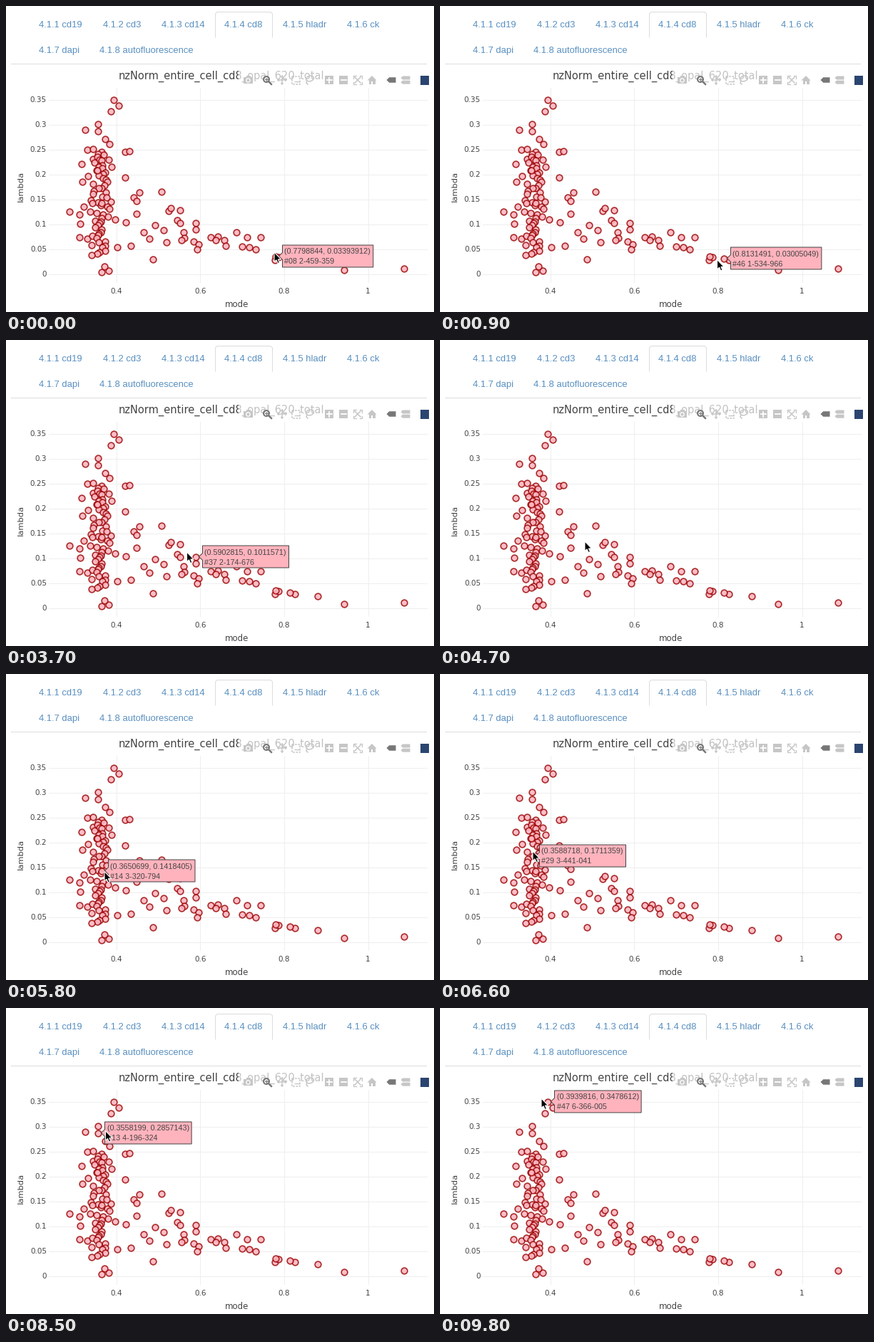
A matplotlib script for the animation above (9.9 s loop, 600 by 430 pixels).

```python
import numpy as np
import matplotlib.pyplot as plt
from matplotlib.animation import FuncAnimation
from matplotlib.patches import Circle, Ellipse, Polygon, Rectangle

W, H, DPI = 600, 430, 100
FRAMES, STEP = 99, 100
PX = 72 / DPI  # points per pixel

SANS, WIDE = "Liberation Sans", "DejaVu Sans"
LINK, INK, GRID = "#5a90c0", "#444444", "#eeeeee"
PINK, RED = (1, 182 / 255, 193 / 255, .9), (152 / 255, 0, 0, .8)
FAINT, ACTIVE, NAVY = "#c6c6c6", "#777777", "#2b4570"

fig = plt.figure(figsize=(W / DPI, H / DPI), dpi=DPI, facecolor="white")
ax = fig.add_axes([0, 0, 1, 1])
ax.set_xlim(0, W)
ax.set_ylim(H, 0)
ax.axis("off")


def to_px(mode, lam):
    return 154.5 + (mode - .4) * 588.5, 376 - lam * 700


def to_data(x, y):
    return .4 + (x - 154.5) / 588.5, (376 - y) / 700


def write(x, y, s, size, color=INK, font=SANS, **kw):
    return ax.text(x, y, s, fontsize=size * PX, color=color, family=font,
                   va=kw.pop("va", "baseline"), **kw)


def line(xs, ys, color, width=1, z=1, **kw):
    ax.plot(xs, ys, color=color, lw=width * PX, zorder=z, **kw)


def shape(patch, fill="none", edge="none", width=1, z=6):
    patch.set(facecolor=fill, edgecolor=edge, linewidth=width * PX, zorder=z)
    return ax.add_patch(patch)


def draw_tabs():
    row1 = [(46, "4.1.1 cd19"), (136, "4.1.2 cd3"), (218, "4.1.3 cd14"),
            (306.5, "4.1.4 cd8"), (388, "4.1.5 hladr"), (478, "4.1.6 ck")]
    row2 = [(46, "4.1.7 dapi"), (131, "4.1.8 autofluorescence")]
    for base, row in ((30, row1), (66, row2)):
        for x, s in row:
            write(x, base, s, 13, LINK)
    line([293.5, 293.5, 296, 371, 373.5, 373.5],
         [44, 11, 8.5, 8.5, 11, 44], "#dcdcdc")
    line([7, 589], [80.5, 80.5], "#dcdcdc")
    line([0, W], [429.5, 429.5], "#c4c4c4")


def draw_axes():
    for i in range(4):
        x = 154.5 + i * 117.7
        line([x, x], [115, 388], GRID)
        write(x, 404, f"{.4 + .2 * i:.1g}", 10.4, font=WIDE, ha="center")
    for i in range(8):
        y = 376.5 - 35 * i
        line([60, 590], [y, y], GRID)
        write(57, y + 3.5, f"{.05 * i:g}", 10.4, font=WIDE, ha="right")
    write(323.5, 423, "mode", 11.7, font=WIDE, ha="center")
    write(21, 253, "lambda", 11.5, font=WIDE, ha="center", va="center",
          rotation=90)
    write(158, 103, "nzNorm_entire_cell_cd8_opal_620_total", 14.65, font=WIDE)


def draw_modebar():
    y = 104
    shape(Rectangle((326, 90), 269, 24), (1, 1, 1, .68), z=5)

    # camera
    shape(Rectangle((333, 100), 13, 9), FAINT)
    shape(Rectangle((336.5, 98), 6, 3), FAINT)
    shape(Circle((339.5, 104.5), 2.7), FAINT, "white", 1.3)

    # magnifier
    shape(Circle((365, 103), 4), edge=ACTIVE, width=2)
    line([368, 372], [106, 110], ACTIVE, 2.4, 6)
    line([363, 367], [103, 103], ACTIVE, 1, 6)
    line([365, 365], [101, 105], ACTIVE, 1, 6)

    # pan arrows
    line([381, 393], [y, y], FAINT, 1.5, 6)
    line([387, 387], [98, 110], FAINT, 1.5, 6)
    for dx, dy in ((1, 0), (-1, 0), (0, 1), (0, -1)):
        cx, cy = 387 + 4 * dx, y + 4 * dy
        shape(Polygon([(cx + 3 * dx, cy + 3 * dy),
                       (cx + 2.5 * dy, cy + 2.5 * dx),
                       (cx - 2.5 * dy, cy - 2.5 * dx)]), FAINT)

    # box select and lasso
    line([401, 412, 412, 401, 401], [98.5, 98.5, 109.5, 109.5, 98.5],
         FAINT, 1.6, 6, ls=(0, (1.6, 1)))
    shape(Ellipse((426, 102), 11, 7.5, angle=-15), edge=FAINT, width=1.5)
    line([422, 421, 423], [105, 108, 110], FAINT, 1.5, 6)

    # zoom in and out
    for x in (453, 473):
        shape(Rectangle((x - 6, 98), 12, 12), FAINT)
        line([x - 3.5, x + 3.5], [y, y], "white", 1.8, 7)
    line([453, 453], [100.5, 107.5], "white", 1.8, 7)

    # autoscale
    for sx in (-1, 1):
        line([493 - 4 * sx, 493 + 4 * sx], [100, 108], FAINT, 1.5, 6)
        for sy in (-1, 1):
            cx, cy = 493 + 6 * sx, y + 6 * sy
            line([cx - 3.5 * sx, cx, cx], [cy, cy, cy - 3.5 * sy],
                 FAINT, 1.3, 6)

    # home
    shape(Polygon([(506.5, 104.5), (513, 98), (519.5, 104.5)]), FAINT)
    shape(Rectangle((508.5, 104), 9, 5.5), FAINT)
    shape(Rectangle((511.8, 105.5), 2.4, 4), "white")

    # hover tags
    def tag(x, cy, w, h, color):
        shape(Polygon([(x, cy), (x + h / 2, cy - h / 2), (x + w, cy - h / 2),
                       (x + w, cy + h / 2), (x + h / 2, cy + h / 2)]), color)

    tag(533.5, y, 13, 7.5, ACTIVE)
    tag(553.5, 101, 13, 5, FAINT)
    tag(553.5, 107.2, 13, 5, FAINT)

    shape(Rectangle((580.5, 98), 12.5, 12.5), NAVY)


# Points spread around the dense column, in pixels
SPREAD = [
    (158, 140), (146.5, 147.5), (128.5, 165.5), (128.5, 176), (110.5, 174),
    (138.5, 187), (145, 194), (166.5, 204.5), (173, 203.5), (114, 201.5),
    (122, 215), (143.5, 216), (105.5, 221.5), (147.5, 226), (166.5, 241),
    (107, 246.5), (115, 238.5), (186.5, 261.5), (178.5, 269), (183, 274),
    (218, 261), (182.5, 292), (147, 275), (153, 300), (167.5, 304),
    (193, 318), (200.5, 327), (209, 308), (221, 314.5), (224.5, 331.5),
    (227.5, 288), (231, 284), (244, 287), (240, 301), (243.5, 305),
    (266, 314), (248.5, 317.5), (250, 325.5), (245.5, 329), (262.5, 330.5),
    (269.5, 335), (267.5, 342), (287, 325), (296.5, 323.5), (305.5, 329),
    (308, 337), (323, 318), (338, 325), (356.5, 325), (331, 337.5),
    (341, 339), (349.5, 342), (376.5, 356.5), (382, 353), (405, 356.5),
    (437, 359.5), (473.5, 370.5), (558, 368.5), (206, 356), (175, 336.5),
    (155.5, 339), (88.5, 288.5), (103, 293), (104, 306), (103, 324.5),
    (109, 282), (114, 327), (144, 371.5), (134, 373.5), (138, 366),
]

# frame: (mode, lambda, label) shown there
STOPS = {
    0: (.7798844, .03393912, "#08 2-459-359"),
    9: (.8131491, .03005049, "#46 1-534-966"),
    24: (.6376567, .06742693, "#33 6-144-782"),
    37: (.5902815, .1011571, "#37 2-174-676"),
    58: (.3650699, .1418405, "#14 3-320-794"),
    75: (.3543938, .2068012, "#10 2-613-495"),
    98: (.3939816, .3478612, "#47 6-366-005"),
}

# frame, x, y of the pointer tip
PATH = np.array([
    (0, 376, 346), (5, 394, 351), (9, 388.5, 356.5), (14, 352, 358),
    (24, 287, 331), (30, 264, 313), (37, 253.5, 298), (47, 203, 283),
    (58, 138, 277.5), (66, 130, 249), (75, 134.5, 219), (86, 140, 168),
    (98, 142, 127),
])


def make_points():
    rng = np.random.default_rng(11)
    n = 58
    ys = 201 + 151 * (np.arange(n) + rng.random(n)) / n
    xs = 131 + np.clip(rng.normal(0, 7.5, n), -14, 14)
    xs[ys < 250] = np.clip(xs[ys < 250], 122, 142)
    xs[ys > 305] = np.clip(xs[ys > 305], 120, 139)
    hovered = [to_px(m, v) for m, v, _ in STOPS.values()]
    pts = np.vstack([SPREAD, np.column_stack([xs, ys]), hovered])
    labels = []
    for x, y in pts:
        a, b, c, d = (rng.integers(lo, hi) for lo, hi in
                      ((1, 50), (1, 7), (100, 700), (0, 1000)))
        m, v = to_data(x, y)
        labels.append(f"({m:.7f}, {v:.7g})\n#{a:02d} {b}-{c}-{d:03d}")
    for k, (m, v, name) in enumerate(STOPS.values(), len(pts) - len(STOPS)):
        labels[k] = f"({m:.7g}, {v:.7g})\n{name}"
    return pts, labels


draw_tabs()
draw_axes()
draw_modebar()
points, labels = make_points()
ax.scatter(points[:, 0], points[:, 1], s=(8.7 * PX) ** 2, color=[PINK],
           edgecolors=[RED], linewidths=1.7 * PX, zorder=3)

box = shape(Polygon([(0, 0), (1, 0), (1, 1)]), "#ffb3bd", INK, 1, 8)
top_text = write(0, 0, "", 10.7, zorder=9)
low_text = write(0, 0, "", 10.7, zorder=9)

ARROW = np.array([(0, 0), (0, 13.5), (3, 10.8), (5.2, 15.6), (7.5, 14.6),
                  (5.4, 10), (9.6, 10)])
cursor = shape(Polygon(ARROW), "black", "white", 1.1, 10)
renderer = fig.canvas.get_renderer()


def hovered_index(i, tip):
    first = len(points) - len(STOPS)
    for k, frame in enumerate(STOPS):
        if 0 <= frame - i <= 2:
            return first + k
    gap = np.hypot(*(points - tip).T)
    k = int(gap.argmin())
    return k if gap[k] <= 20 else None


def show_tip(k):
    for artist in (box, top_text, low_text):
        artist.set_visible(k is not None)
    if k is None:
        return
    x, y = points[k]
    top, low = labels[k].split("\n")
    left = round(x + 9) + .5
    mid = round(y) - .5
    top_text.set(text=top, position=(left + 3, mid - 3))
    low_text.set(text=low, position=(left + 3, mid + 11))
    right = left + 6.5 + max(t.get_window_extent(renderer).width
                             for t in (top_text, low_text))
    up, down = mid - 15.5, mid + 15.5
    box.set_xy([(left - 5, mid), (left, mid - 5), (left, up), (right, up),
                (right, down), (left, down), (left, mid + 5)])


def update(i):
    tip = np.array([np.interp(i, PATH[:, 0], PATH[:, c]) for c in (1, 2)])
    cursor.set_xy(ARROW + tip)
    show_tip(hovered_index(i, tip))
    return box, top_text, low_text, cursor


anim = FuncAnimation(fig, update, frames=FRAMES, interval=STEP, repeat=True,
                     repeat_delay=0, blit=False)
plt.show()
```
